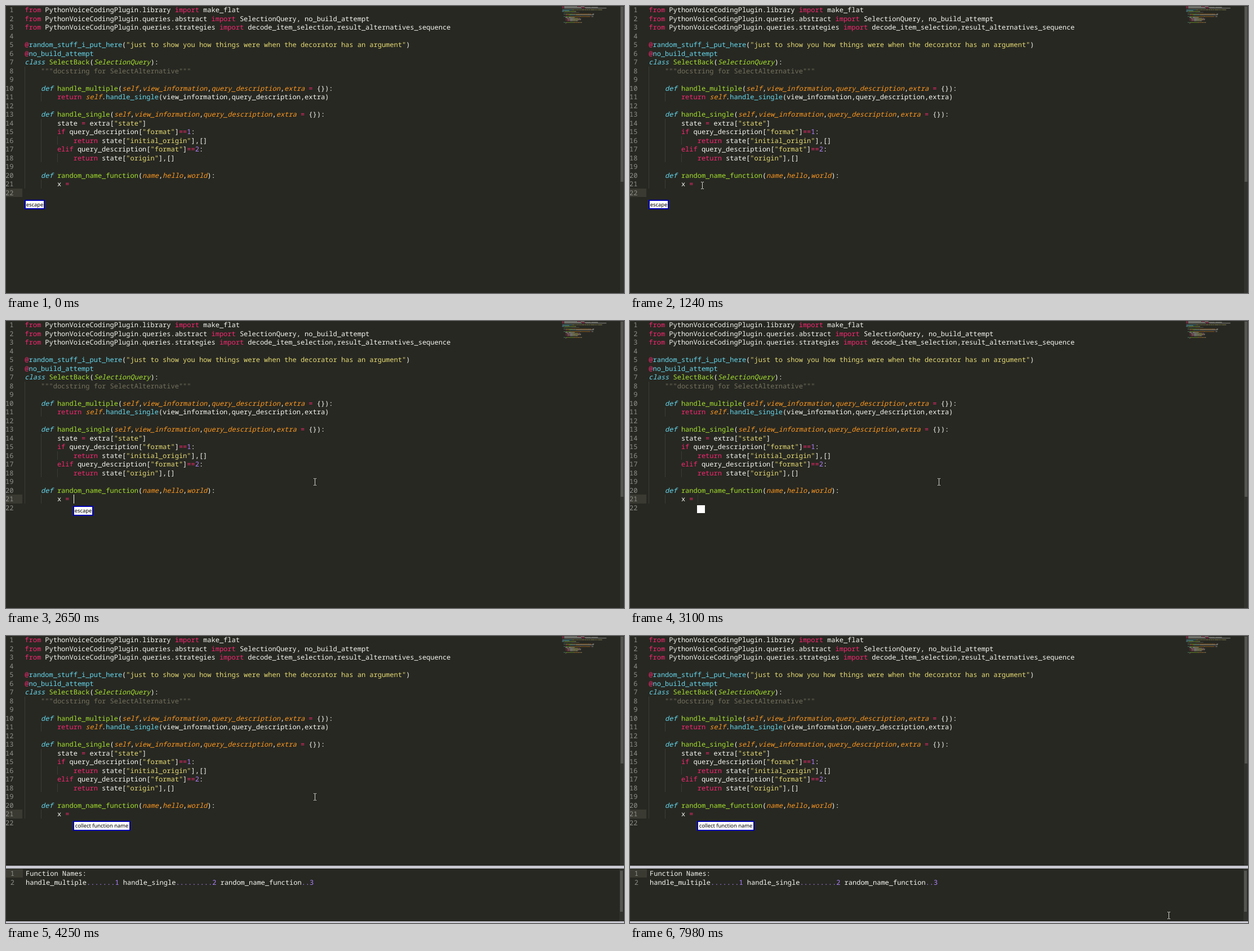
An HTML page with a canvas for the animation above (8000 ms loop, 1097 px wide and 511 px high).

```html
<!DOCTYPE html>
<html lang="en">
<head>
<meta charset="utf-8">
<title>Voice coding in an editor</title>
<style>
  html, body { margin: 0; width: 100%; height: 100%; overflow: hidden; background: #272822; }
  canvas { display: block; }
</style>
</head>
<body>
<canvas id="stage" width="1097" height="511"></canvas>
<script>
const LOOP = 8000, W = 1097, H = 511;
const CHAR = 7.2, LINE = 15.52, LEFT = 33.3;
const MONO = '500 12px "Noto Sans Mono", monospace';
const BACKGROUND = '#272822', GUTTER_ACTIVE = '#3a3a32', GUTTER_TEXT = '#8f908a', BAR = '#c8c8d2';
const ctx = document.getElementById('stage').getContext('2d');

// "~x" switches style: plain, keyword, string, green, blue, orange, number, comment; capitals are italic.
const COLORS = {
  w: '#f8f8f2', k: '#f92672', s: '#e6db74', g: '#a6e22e',
  b: '#66d9ef', o: '#fd971f', n: '#ae81ff', c: '#75715e'
};
const params = '~w(~Oself~w,~Oview_information~w,~Oquery_description~w,~Oextra ~k= ~w{}):';
const code = [
  '~kfrom ~wPythonVoiceCodingPlugin.library ~kimport ~wmake_flat',
  '~kfrom ~wPythonVoiceCodingPlugin.queries.abstract ~kimport ~wSelectionQuery, no_build_attempt',
  '~kfrom ~wPythonVoiceCodingPlugin.queries.strategies ~kimport ~wdecode_item_selection,result_alternatives_sequence',
  '',
  '~k@~brandom_stuff_i_put_here~w(~s"just to show you how things were when the decorator has an argument"~w)',
  '~k@~bno_build_attempt',
  '~Bclass ~gSelectBack~w(~GSelectionQuery~w):',
  '~c    """docstring for SelectAlternative"""',
  '',
  '~B    def ~ghandle_multiple' + params,
  '~k        return ~Oself~w.~bhandle_single~w(view_information,query_description,extra)',
  '',
  '~B    def ~ghandle_single' + params,
  '~w        state ~k= ~wextra[~s"state"~w]',
  '~k        if ~wquery_description[~s"format"~w]~k==~n1~w:',
  '~k            return ~wstate[~s"initial_origin"~w],[]',
  '~k        elif ~wquery_description[~s"format"~w]~k==~n2~w:',
  '~k            return ~wstate[~s"origin"~w],[]',
  '',
  '~B    def ~grandom_name_function~w(~Oname~w,~Ohello~w,~Oworld~w):',
  '~w        x ~k=',
  ''
].map(parse);
const results = [
  '~wFunction Names:',
  '~whandle_multiple~n.......1 ~whandle_single~n.........2 ~wrandom_name_function~n..3'
].map(parse);

// The mouse rests at the end of each glide until the next one starts.
const glides = [
  { start: 70, end: 760, steps: 9, from: [785, 457], to: [124, 325] },
  { start: 930, end: 1080, steps: 2, from: [126, 323], to: [129, 319] },
  { start: 1390, end: 1540, steps: 1, from: [134, 319], to: [134, 321] },
  { start: 1850, end: 2400, steps: 7, from: [181, 318], to: [549, 286] },
  { start: 7550, end: 7980, steps: 6, from: [577, 286], to: [957, 497] }
];

function parse(source) {
  let column = 0;
  return source.split('~').slice(1).map(part => {
    const style = part[0], text = part.slice(1);
    const token = { text, column, color: COLORS[style.toLowerCase()], italic: style < 'a' };
    column += text.length;
    return token;
  });
}

function rect(x, y, w, h, color) {
  ctx.fillStyle = color;
  ctx.fillRect(x, y, w, h);
}

function write(text, x, y, color, font = MONO, align = 'left') {
  ctx.font = font;
  ctx.fillStyle = color;
  ctx.textAlign = align;
  ctx.fillText(text, x, y);
}

function drawLines(lines, left, baseline, numberRight) {
  lines.forEach((tokens, i) => {
    const y = Math.round(baseline + i * LINE);
    write(i + 1, numberRight, y, GUTTER_TEXT, MONO, 'right');
    for (const { text, column, color, italic } of tokens)
      write(text, left + column * CHAR, y, color, (italic ? 'italic ' : '') + MONO);
  });
}

const rowTop = row => Math.round((row - 1) * LINE - 1);

// One guide per indent level, left of the line's own indentation.
function drawGuides() {
  code.forEach((tokens, i) => {
    const row = i + 1;
    if (row < 8 || row > 21) return;
    const indent = tokens.length ? tokens[0].text.search(/\S/) : 4;
    for (let column = 0; column < indent; column += 4)
      rect(Math.round(LEFT + column * CHAR), rowTop(row), 1, rowTop(row + 1) - rowTop(row), '#3b3c35');
  });
}

function drawMinimap() {
  ctx.globalAlpha = .5;
  code.forEach((tokens, i) => {
    for (const { text, column, color } of tokens)
      for (const word of text.matchAll(/\S+/g))
        rect(987 + (column + word.index) * .75, .3 + i * 1.5, word[0].length * .75, 1, color);
  });
  ctx.globalAlpha = 1;
}

function drawScrollbar(x, top, bottom, thumbTop, thumbBottom) {
  rect(x, top, 7, bottom - top, '#32332e');
  rect(x + 1, thumbTop, 5, thumbBottom - thumbTop, '#555651');
}

function drawTooltip(text, x, y, w, h) {
  rect(x, y, w, h, '#0000b4');
  rect(x + 2, y + 2, w - 4, h - 4, '#fff');
  write(text, x + w / 2, y + h / 2 + 3, '#000', '9.4px "Noto Sans", sans-serif', 'center');
}

function drawPanel(showResults) {
  rect(0, 409, W, H - 409, BACKGROUND);
  rect(0, 409, W, 5, BAR);
  rect(0, 508, W, 3, BAR);
  drawScrollbar(1089, 414, 508, 418, 491);
  if (!showResults) return;
  rect(0, 415, 30, 15, GUTTER_ACTIVE);
  drawLines(results, 35, 427, 15);
}

function drawCaret(t) {
  if (t < 1390 || t >= 4020) return;
  const blink = .5 + Math.cos((t - 1700) / 1060 * 2 * Math.PI);
  ctx.globalAlpha = Math.min(1, Math.max(0, blink));
  rect(120, 309, 1, 16, COLORS.w);
  ctx.globalAlpha = 1;
}

function drawMouse(t) {
  const glide = glides.findLast(g => g.start <= t);
  if (!glide || t >= 1080 && t < 1240) return;
  const { start, end, steps, from, to } = glide;
  const progress = Math.min(1, Math.round((t - start) / (end - start) * steps) / steps);
  const [x, y] = from.map((value, axis) => Math.round(value + (to[axis] - value) * progress));
  const color = '#d8d8d4';
  rect(x - 1, y - 5, 1, 11, color);
  for (const edge of [y - 6, y + 6]) {
    rect(x - 3, edge, 2, 1, color);
    rect(x, edge, 2, 1, color);
  }
}

function draw(t) {
  const panelOpen = t >= 4170;
  const row = t < 1390 ? 22 : 21;
  rect(0, 0, W, H, BACKGROUND);
  rect(0, rowTop(row), 29, rowTop(row + 1) - rowTop(row), GUTTER_ACTIVE);
  drawGuides();
  drawLines(code, LEFT, 11, 13.5);
  drawMinimap();
  drawScrollbar(1090, 0, panelOpen ? 409 : H, 1, panelOpen ? 227 : 313);
  drawCaret(t);

  if (t < 2550) drawTooltip('escape', 33, 345, 36, 17);
  else if (t < 2780) drawTooltip('escape', 119, 329, 36, 18);
  else if (t < 3940) rect(119, 328, 14, 14, '#fff');
  else drawTooltip('collect function name', 119, 329, 102, 18);

  if (panelOpen) drawPanel(t >= 4250);
  drawMouse(t);
}

ctx.textRendering = 'geometricPrecision';
const start = performance.now();
function frame() {
  draw((performance.now() - start) % LOOP);
  requestAnimationFrame(frame);
}
frame();
</script>
</body>
</html>
```
